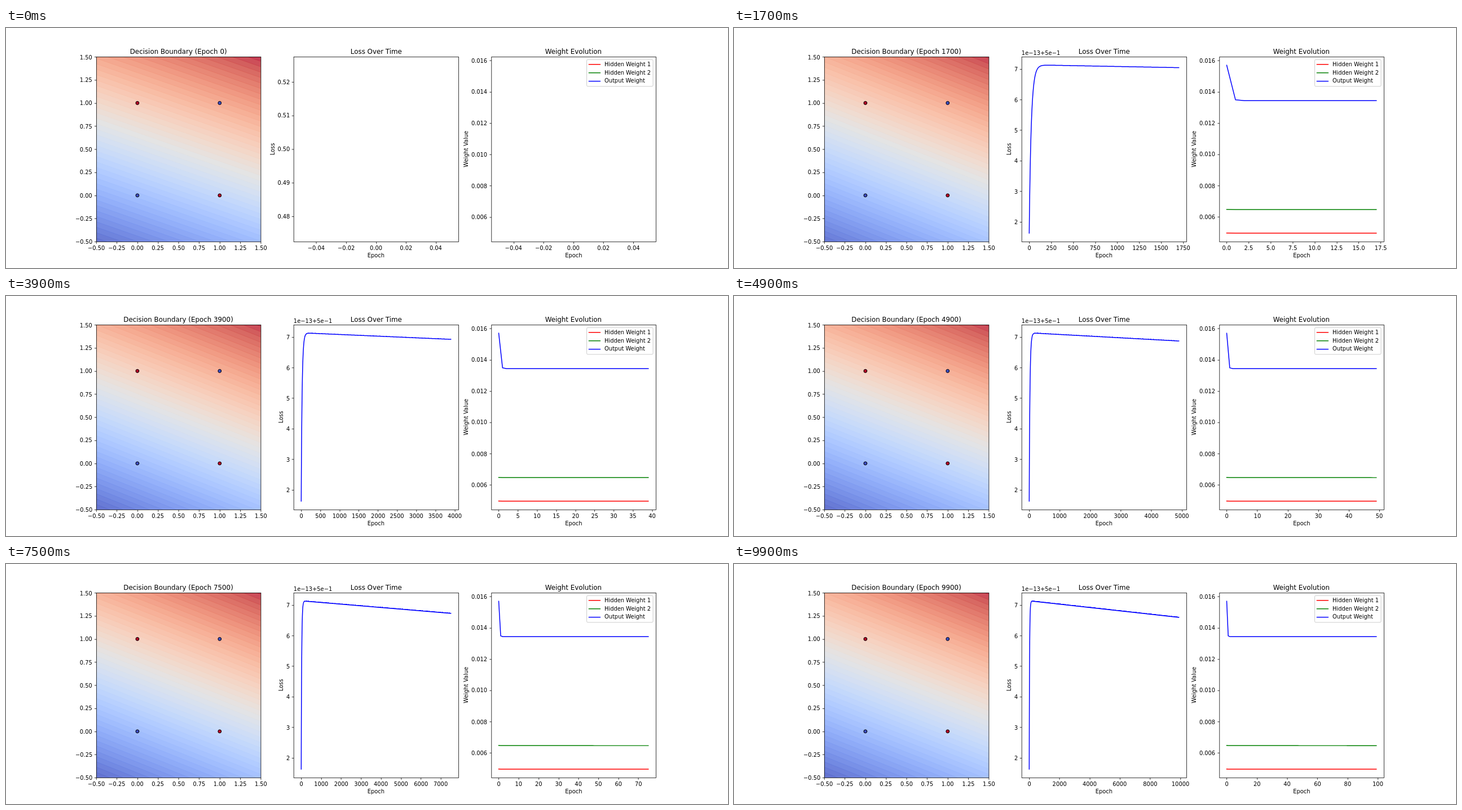
An HTML page with a canvas for the animation above (10000 ms loop, 1280 by 427 pixels).

```html
<!DOCTYPE html>
<html lang="en">
<head>
<meta charset="utf-8">
<title>Training progress</title>
<style>
html, body { margin: 0; width: 100%; height: 100%; overflow: hidden; background: #fff; }
canvas { display: block; width: 1280px; height: 427px; }
</style>
</head>
<body>
<canvas id="stage" width="1280" height="427"></canvas>
<script>
const ctx = document.getElementById('stage').getContext('2d');

// Layout lives in an 1800 x 600 figure at 100 dpi.
const PT = 100 / 72;
const TOP = 72, BOTTOM = 534, HEIGHT = BOTTOM - TOP;
const WIDTH = 1395 / 3.4;
const LEFT = [0, 1, 2].map(i => 225 + i * WIDTH * 1.2);
const SMALL = 10 * PT, LARGE = 12 * PT;
const ASCENT = 11, DESCENT = 3; // small text line, in whole pixels
const THIN = 0.8 * PT, THICK = 1.5 * PT;
const FRAME_MS = 100, FRAMES = 100, EPOCHS = 100;

// ---- a 2-2-1 sigmoid network learning XOR ----
const XOR = [[0, 0, 0], [0, 1, 1], [1, 0, 1], [1, 1, 0]];
const RATE = 0.1;
const LOSS_BASE = 0.499999999992;
const net = {
  u: [0.004967141530, -0.001382643012],
  v: [0.006476885381, 0.015230298564],
  b: [-0.002341533747, -0.002341369569],
  w: [0.015792128155, 0.007674347292],
  c: -0.004694743859
};
const sigmoid = z => 1 / (1 + Math.exp(-z));

function forward(x, y) {
  const h = [0, 1].map(j => sigmoid(x * net.u[j] + y * net.v[j] + net.b[j]));
  return { h, out: sigmoid(h[0] * net.w[0] + h[1] * net.w[1] + net.c) };
}

function train() {
  const g = { u: [0, 0], v: [0, 0], b: [0, 0], w: [0, 0], c: 0 };
  let loss = 0;
  for (const [x, y, target] of XOR) {
    const { h, out } = forward(x, y);
    loss += Math.abs(target - out) / 4;
    const d = (target - out) * out * (1 - out);
    g.c += d;
    for (let j = 0; j < 2; j++) {
      const dh = d * net.w[j] * h[j] * (1 - h[j]);
      g.w[j] += d * h[j];
      g.b[j] += dh;
      g.u[j] += dh * x;
      g.v[j] += dh * y;
    }
  }
  for (const key of ['u', 'v', 'b', 'w']) {
    for (let j = 0; j < 2; j++) net[key][j] += RATE * g[key][j];
  }
  net.c += RATE * g.c;
  return loss;
}

const losses = [], history = [];
for (let e = 0; e <= (FRAMES - 1) * EPOCHS; e++) {
  losses.push((train() - LOSS_BASE) * 1e13);
  if (e % EPOCHS === 0) {
    const lo = forward(-0.5, -0.5).out;
    history.push({
      weights: [net.u[0], net.v[0], net.w[0]],
      lo,
      gx: forward(1.5, -0.5).out - lo,
      gy: forward(-0.5, 1.5).out - lo
    });
  }
}

// ---- scales and ticks ----
function niceStep(raw, steps) {
  const mag = 10 ** Math.floor(Math.log10(raw));
  return mag * steps.find(s => s * mag >= raw * (1 - 1e-9));
}

function ticks([lo, hi]) {
  const step = niceStep((hi - lo) / 9, [1, 2, 2.5, 5, 10]);
  let digits = 0;
  while (digits < 6 && Math.abs(step * 10 ** digits - Math.round(step * 10 ** digits)) > 1e-6) digits++;
  const list = [];
  for (let i = Math.ceil(lo / step - 1e-9); i * step <= hi + step * 1e-9; i++) {
    list.push({ value: i * step, label: (i * step).toFixed(digits).replace('-', '\u2212') });
  }
  return list;
}

function padded(values) {
  let lo = Infinity, hi = -Infinity;
  for (const v of values) { lo = Math.min(lo, v); hi = Math.max(hi, v); }
  const m = (hi - lo) * 0.05;
  return [lo - m, hi + m];
}

// Thin lines sit on pixel centres.
const snap = v => Math.round(v) + 0.5;

// ---- drawing helpers ----
function setFont(size = SMALL) {
  ctx.font = size + 'px "DejaVu Sans", sans-serif';
}

const ALIGN = { left: 0, center: 0.5, right: 1 };

// Text starts on a whole pixel.
function text(str, x, y, align = 'left', size = SMALL) {
  setFont(size);
  ctx.fillStyle = '#000';
  const { width } = ctx.measureText(str);
  ctx.fillText(str, Math.round(x - width * ALIGN[align]), Math.round(y));
  return width;
}

function stroke(points, color, width, cap = 'square') {
  ctx.beginPath();
  for (const [x, y] of points) ctx.lineTo(x, y);
  ctx.strokeStyle = color;
  ctx.lineWidth = width;
  ctx.lineCap = cap;
  ctx.lineJoin = 'round';
  ctx.stroke();
}

function makeAxes(index, xlim, ylim) {
  const left = LEFT[index];
  return {
    left, xlim, ylim,
    x: v => left + (v - xlim[0]) / (xlim[1] - xlim[0]) * WIDTH,
    y: v => BOTTOM - (v - ylim[0]) / (ylim[1] - ylim[0]) * HEIGHT
  };
}

function drawAxes(ax, title, xlabel, ylabel) {
  const { left } = ax, mid = left + WIDTH / 2;
  const x0 = snap(left), x1 = snap(left + WIDTH), y0 = snap(TOP), y1 = snap(BOTTOM);
  const tick = 3.5 * PT, pad = 7 * PT;
  const tickBase = BOTTOM + pad + ASCENT;
  for (const t of ticks(ax.xlim)) {
    const x = ax.x(t.value), sx = snap(x);
    stroke([[sx, y1], [sx, y1 + tick]], '#000', THIN, 'butt');
    text(t.label, x, tickBase, 'center');
  }
  let widest = 0;
  for (const t of ticks(ax.ylim)) {
    const y = ax.y(t.value), sy = snap(y);
    stroke([[x0, sy], [x0 - tick, sy]], '#000', THIN, 'butt');
    widest = Math.max(widest, text(t.label, left - pad, y + ASCENT / 2, 'right'));
  }
  ctx.strokeStyle = '#000';
  ctx.lineWidth = THIN;
  ctx.lineJoin = 'miter';
  ctx.strokeRect(x0, y0, x1 - x0, y1 - y0);

  text(title, mid, TOP - 6 * PT, 'center', LARGE);
  if (xlabel) text(xlabel, mid, tickBase + DESCENT + 4 * PT + ASCENT, 'center');
  if (ylabel) {
    setFont();
    const bearing = -ctx.measureText(ylabel).actualBoundingBoxLeft;
    ctx.save();
    ctx.translate(Math.round(left - pad - widest - 4 * PT - DESCENT + bearing), (TOP + BOTTOM) / 2);
    ctx.rotate(-Math.PI / 2);
    text(ylabel, 0, 0, 'center');
    ctx.restore();
  }
}

// ---- panels ----
const COOLWARM = [
  [59, 76, 192], [77, 104, 215], [98, 130, 234], [119, 154, 247], [141, 176, 254], [163, 194, 255],
  [184, 208, 249], [204, 217, 238], [221, 221, 221], [236, 211, 197], [245, 196, 173], [247, 177, 148],
  [244, 154, 123], [236, 127, 99], [222, 96, 77], [203, 62, 56], [180, 4, 38]
];

function coolwarm(t, alpha = 1) {
  const p = t * (COOLWARM.length - 1), i = Math.min(Math.floor(p), COOLWARM.length - 2);
  const rgb = COOLWARM[i].map((c, k) => {
    const mix = c + (COOLWARM[i + 1][k] - c) * (p - i);
    return Math.round(255 + (mix - 255) * alpha);
  });
  return `rgb(${rgb})`;
}

function drawBoundary(frame) {
  const { lo, gx, gy } = history[frame];
  const ax = makeAxes(0, [-0.5, 1.5], [-0.5, 1.5]);
  const right = ax.left + WIDTH;
  const step = niceStep((gx + gy) / 51, [1, 1.5, 2, 2.5, 3, 4, 5, 6, 8, 10]);
  const first = Math.floor((lo - 0.1) / step);
  const bands = Math.ceil((lo + gx + gy - 0.1) / step) - first;

  ctx.save();
  ctx.beginPath();
  ctx.rect(ax.left, TOP, WIDTH, HEIGHT);
  ctx.clip();
  for (let i = 0; i < bands; i++) {
    const rise = 0.1 + (first + i) * step - lo;
    const y0 = BOTTOM - rise / gy * HEIGHT;
    const y1 = BOTTOM - (rise - gx) / gy * HEIGHT;
    const shade = (i + 0.5) / bands;
    ctx.beginPath();
    ctx.moveTo(ax.left, y0);
    ctx.lineTo(right, y1);
    ctx.lineTo(right, -900);
    ctx.lineTo(ax.left, -900);
    ctx.fillStyle = coolwarm(shade, 0.8);
    ctx.fill();
    // neighbouring translucent bands overlap in a thin seam
    ctx.globalAlpha = 0.45;
    if (i) stroke([[ax.left, y0], [right, y1]], coolwarm(shade), 1, 'butt');
    ctx.globalAlpha = 1;
  }
  ctx.restore();

  for (const [x, y, target] of XOR) {
    ctx.beginPath();
    ctx.arc(ax.x(x), ax.y(y), 3 * PT, 0, 2 * Math.PI);
    ctx.fillStyle = coolwarm(target);
    ctx.fill();
    ctx.strokeStyle = '#000';
    ctx.lineWidth = PT;
    ctx.stroke();
  }
  drawAxes(ax, `Decision Boundary (Epoch ${frame * EPOCHS})`);
}

function drawLoss(frame) {
  const n = frame * EPOCHS;
  const seen = losses.slice(0, n + 1);
  const ax = n
    ? makeAxes(1, padded([0, n]), padded(seen))
    : makeAxes(1, [-0.055, 0.055], [0.4725, 0.5275]);
  if (n) {
    stroke(seen.map((v, e) => [ax.x(e), ax.y(v)]), '#00f', THICK);
    text('1e\u221213+5e\u22121', ax.left, TOP - 3 * PT);
  }
  drawAxes(ax, 'Loss Over Time', 'Epoch', 'Loss');
}

const SERIES = [['Hidden Weight 1', '#f00'], ['Hidden Weight 2', '#008000'], ['Output Weight', '#00f']];

function drawLegend(right) {
  setFont();
  const edge = right - 5 * PT, top = TOP + 5 * PT, pad = 4 * PT, gap = 5 * PT;
  const row = ASCENT + DESCENT;
  const tx = edge - pad - ctx.measureText(SERIES[0][0]).width;
  const hx = tx - 28 * PT;
  ctx.beginPath();
  ctx.roundRect(hx - pad, top, edge - hx + pad, 2 * pad + 3 * row + 2 * gap, 2 * PT);
  ctx.fillStyle = 'rgba(255,255,255,.8)';
  ctx.fill();
  ctx.strokeStyle = '#ccc';
  ctx.lineWidth = PT;
  ctx.stroke();
  SERIES.forEach(([name, color], i) => {
    const base = top + pad + ASCENT + i * (row + gap);
    const y = Math.round(base - 3.5 * PT);
    stroke([[hx, y], [hx + 20 * PT, y]], color, THICK);
    text(name, tx, base);
  });
}

function drawWeights(frame) {
  const seen = history.slice(0, frame + 1);
  const ax = makeAxes(2, frame ? padded([0, frame]) : [-0.055, 0.055],
    padded(seen.flatMap(s => s.weights)));
  if (frame) {
    SERIES.forEach(([, color], i) =>
      stroke(seen.map((s, k) => [ax.x(k), ax.y(s.weights[i])]), color, THICK));
  }
  drawAxes(ax, 'Weight Evolution', 'Epoch', 'Weight Value');
  drawLegend(ax.left + WIDTH);
}

// ---- playback ----
function draw(frame) {
  ctx.setTransform(1280 / 1800, 0, 0, 427 / 600, 0, 0);
  ctx.fillStyle = '#fff';
  ctx.fillRect(0, 0, 1800, 600);
  drawBoundary(frame);
  drawLoss(frame);
  drawWeights(frame);
}

let shown = -1;
const start = performance.now();
function tick() {
  const frame = Math.floor((performance.now() - start) / FRAME_MS) % FRAMES;
  if (frame !== shown) draw(shown = frame);
  requestAnimationFrame(tick);
}
tick();
</script>
</body>
</html>
```
